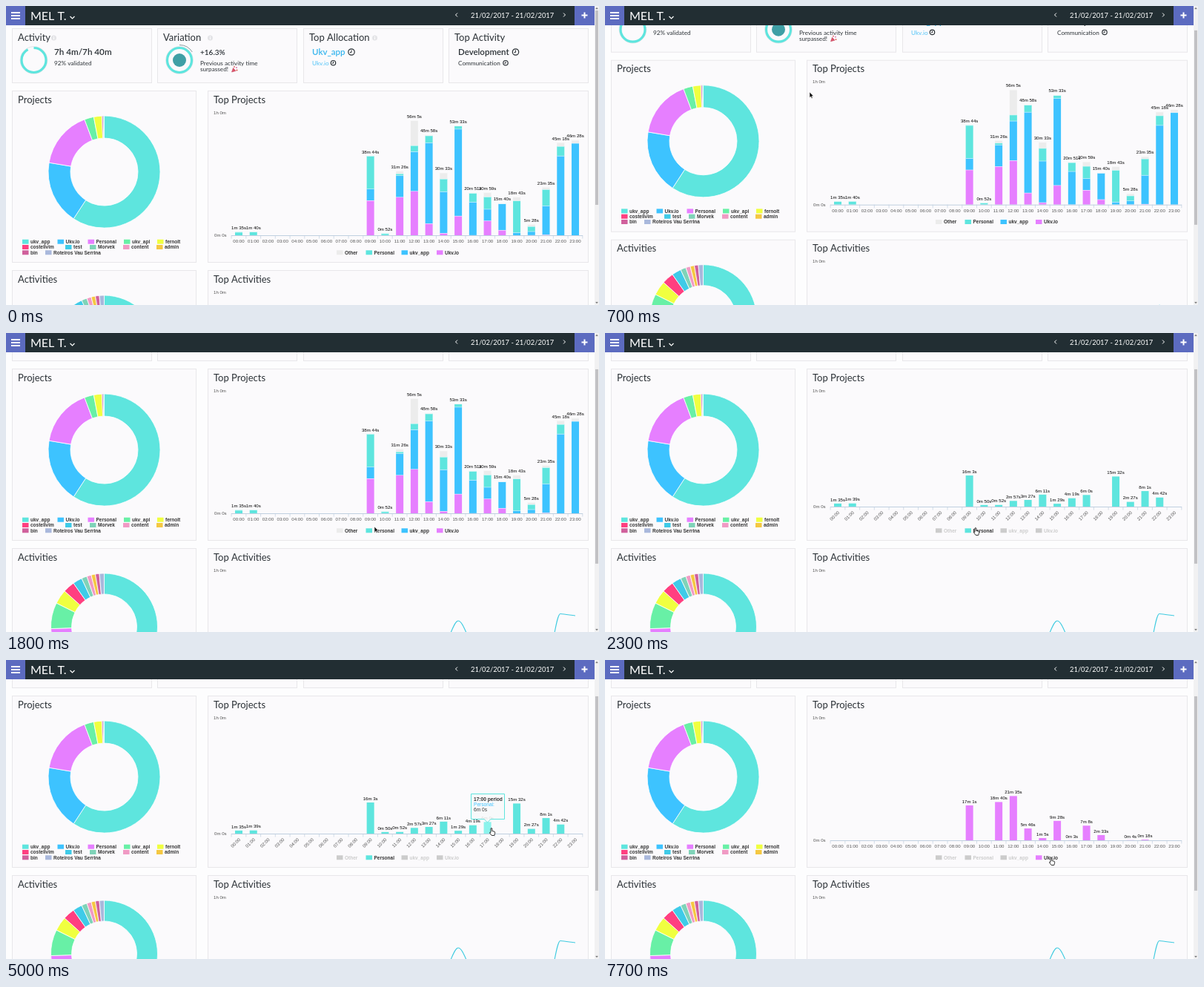
Animation, 800 px wide and 403 px high, one loop 8000 ms. Source, as an HTML page with a canvas:

```html
<!DOCTYPE html>
<html lang="en">
<head>
<meta charset="utf-8">
<title>Time dashboard</title>
<style>
  html, body { margin: 0; width: 100%; height: 100%; overflow: hidden; background: #fdfdfe; }
  canvas { display: block; }
</style>
</head>
<body>
<canvas id="stage" width="800" height="403"></canvas>
<script>
const ctx = document.getElementById('stage').getContext('2d');
const LOOP = 8000, TAU = Math.PI * 2;
const UI = 'Lato, "Open Sans", sans-serif', CHART = '"Liberation Sans", Arial, sans-serif';
const TEAL = '#5ee5de', BLUE = '#3dc3ff', PINK = '#e67fff', GREY = '#ececec', OFF = '#cccccc';
const DARK = '#2b3136', INDIGO = '#5c6bc0';

const projects = [
  ['ukv_app', TEAL, 22, 0], ['Ukv.io', BLUE, 69.5, 0], ['Personal', PINK, 110.5, 0],
  ['ukv_api', '#68f0a6', 159, 0], ['fernolt', '#f0ff40', 204, 0],
  ['costelivim', '#ff3f80', 22, 1], ['test', '#3fcbe8', 80, 1], ['Morvek', '#7fd3b8', 113, 1],
  ['content', '#f09ac4', 158, 1], ['admin', '#f5c842', 203, 1],
  ['bin', '#d0609c', 22, 2], ['Roteiros Vau Serrina', '#a9b8dc', 53, 2]
];
const palette = projects.map(p => p[1]);
const projectEnds = [213.2, 279.5, 339.4, 349.2, 357.6, 359, 360];
const activityEnds = [190, 230, 268, 296.4, 312, 324.8, 335, 341, 345.9, 350.4, 354.8, 360];

// seconds per hour of day: total, Personal, Ukv.io, Other
const hours = {
  0: [95, 95, 0, 0], 1: [100, 99, 0, 0], 9: [2324, 963, 1021, 0], 10: [52, 50, 0, 0],
  11: [1886, 52, 1120, 80], 12: [3365, 177, 1295, 735], 13: [2938, 207, 346, 20],
  14: [1833, 371, 65, 180], 15: [3213, 89, 568, 10], 16: [1251, 259, 3, 15],
  17: [1259, 360, 428, 130], 18: [940, 0, 153, 15], 19: [1123, 932, 0, 110],
  20: [328, 147, 4, 65], 21: [1415, 481, 18, 70], 22: [2718, 282, 0, 110], 23: [2788, 0, 0, 90]
};
const series = [
  ['Other', GREY, 446], ['Personal', TEAL, 485.5], ['ukv_app', BLUE, 533.5], ['Ukv.io', PINK, 581]
];

const scrollKeys = [[300, 0], [400, 8], [500, 8], [600, 24], [700, 41.3], [800, 56], [900, 66]];
const cursorKeys = [
  [400, 276, 116], [1000, 276, 116], [1800, 497, 261], [2100, 498, 262], [3100, 498, 262],
  [3600, 562, 241], [3900, 612, 238], [4200, 612, 238], [5000, 653, 226], [5300, 653, 226],
  [5500, 648, 232], [6100, 602, 254], [6500, 600, 266]
];

function track(keys, t) {
  const i = keys.findIndex(k => k[0] > t);
  if (i < 0) return keys[keys.length - 1].slice(1);
  if (!i) return keys[0].slice(1);
  const a = keys[i - 1], b = keys[i], p = (t - a[0]) / (b[0] - a[0]);
  return a.slice(1).map((v, n) => v + (b[n + 1] - v) * p);
}

function text(s, x, y, size, color = DARK, weight = 400, family = UI, align = 'left') {
  ctx.font = `${weight} ${size}px ${family}`;
  ctx.fillStyle = color;
  ctx.textAlign = align;
  ctx.fillText(s, x, y);
}
const label = (s, x, y, align, color = '#000') => text(s, x, y, 6.1, color, 400, CHART, align);

function rect(x, y, w, h, color) {
  ctx.fillStyle = color;
  ctx.fillRect(x, y, w, h);
}
function line(points, color, width = 1) {
  ctx.beginPath();
  points.forEach(p => ctx.lineTo(...p));
  ctx.strokeStyle = color;
  ctx.lineWidth = width;
  ctx.stroke();
}
function arc(x, y, r, color, width, from = 0, to = 1) {
  ctx.beginPath();
  ctx.arc(x, y, r, (from - .25) * TAU, (to - .25) * TAU);
  ctx.strokeStyle = color;
  ctx.lineWidth = width;
  ctx.stroke();
}
function disc(x, y, r, color) {
  ctx.beginPath();
  ctx.arc(x, y, r, 0, TAU);
  ctx.fillStyle = color;
  ctx.fill();
}
function shape(path, fill, stroke, width) {
  const p = new Path2D(path);
  ctx.fillStyle = fill;
  ctx.fill(p);
  ctx.strokeStyle = stroke;
  ctx.lineWidth = width;
  ctx.stroke(p);
}

function card(x, y, w, h, title) {
  rect(x, y, w, h, '#fbfafc');
  ctx.strokeStyle = '#e8e7ea';
  ctx.lineWidth = 1;
  ctx.strokeRect(x + .5, y + .5, w - 1, h - 1);
  text(title, x + 8, y + 16.5, 13);
}
function info(x, y) {
  disc(x, y, 3.5, '#e4e4e7');
  rect(x - .5, y - 2, 1, 1, '#fff');
  rect(x - .5, y - .5, 1, 2.5, '#fff');
}
function clock(x, y, r) {
  arc(x, y, r, DARK, 1.2);
  line([[x, y - r * .6], [x, y + .5], [x - r * .5, y + .5]], DARK);
}

function donut(x, y, outer, inner, ends, colors) {
  let from = 0;
  ends.forEach((end, i) => {
    const a = (from / 360 - .25) * TAU, b = (end / 360 - .25) * TAU;
    ctx.beginPath();
    ctx.arc(x, y, outer, a, b);
    ctx.arc(x, y, inner, b, a, true);
    ctx.closePath();
    ctx.fillStyle = colors[i];
    ctx.fill();
    ctx.strokeStyle = '#fff';
    ctx.lineWidth = .8;
    ctx.stroke();
    from = end;
  });
}

function legendItem(name, color, x, y, ink = '#333') {
  rect(x, y - 3, 8.5, 6, color);
  text(name, x + 11, y + 2.2, 6.5, ink, 700, CHART);
}

function summaryCards() {
  card(8, 30, 189, 74, 'Activity');
  info(64.5, 43);
  arc(37.5, 73, 18.3, '#d9dde0', .8);
  arc(37.5, 73, 16.5, TEAL, 3.2, 0, .92);
  text('7h 4m/7h 40m', 65, 66, 11.7, DARK, 600);
  text('92% validated', 65, 80, 8.2);

  card(204, 30, 189, 74, 'Variation');
  info(275.5, 43);
  arc(234, 73, 18.3, '#d9dde0', .8);
  arc(234, 73, 16.5, TEAL, 3.2);
  arc(234, 73, 20.5, '#8b9a9e', 1, 0, .16);
  disc(234, 73, 9, '#3f9fa5');
  text('+16.3%', 262, 66, 10, DARK, 600);
  text('Previous activity time', 262, 80, 8.2);
  text('surpassed!', 262, 88, 8.2);
  shape('M304.5 89L306.5 83.5L310 87.5Z', '#e0526a', '#b8405a', .5);
  [[308, 82, '#e05a5a'], [311, 83, '#d66ba8'], [311.5, 86.5, '#d8503c']]
    .forEach(([x, y, c]) => disc(x, y, .9, c));

  card(401, 30, 189, 74, 'Top Allocation');
  info(497.5, 43);
  text('Ukv_app', 413, 66, 11.5, '#35b5ee', 600);
  clock(466, 62, 4.2);
  text('Ukv.io', 413, 80, 8.2, '#4fc3f7');
  clock(441.5, 76.7, 3.2);

  card(597, 30, 189, 74, 'Top Activity');
  text('Development', 610, 66, 11.5, DARK, 600);
  clock(687.5, 62, 4.2);
  text('Communication', 610, 80, 8.2);
  clock(674, 76.7, 3.2);
}

function projectCard() {
  card(8, 114, 249, 232, 'Projects');
  donut(132.5, 223.6, 75.5, 45.5, projectEnds, [...palette.slice(0, 5), '#d0609c', '#3fcbe8']);
  projects.forEach(([name, color, x, row]) => legendItem(name, color, x, 317.7 + row * 7.3));
}

const duration = s => `${Math.floor(s / 60)}m ${s % 60}s`;

function barChart(t) {
  card(272, 114, 514, 232, 'Top Projects');
  const only = t < 2300 ? '' : t < 7500 ? 'Personal' : 'Ukv.io';
  const slanted = only === 'Personal';
  const base = slanted ? 300 : 309, scale = (base - 143.2) / 3600;
  const grow = only === 'Ukv.io' ? Math.min(1, .35 + (t - 7500) / 300) : 1;
  const tip = t >= 4700 && t < 6500, step = 19.74;
  label('1h 0m', 280, 145.6, 'left', '#555');
  label('0m 0s', 281, base + 2.2, 'left', '#555');

  const tops = [];
  for (const h in hours) {
    const [total, personal, site, other] = hours[h], x = 314 + h * step;
    const parts = [[site, 'Ukv.io', PINK], [total - personal - site - other, 'ukv_app', BLUE],
      [personal, 'Personal', TEAL], [other, 'Other', GREY]];
    let y = base, sum = 0;
    for (const [value, name, color] of parts) {
      if (!value || only && name !== only) continue;
      const height = value * scale * grow;
      y -= height;
      sum += value;
      rect(x - 5, y, 10, height, tip && t < 5600 && h === '17' ? '#8cf3ec' : color);
      if (!only) rect(x - 5, y, 10, .6, '#fff');
    }
    if (sum) tops.push([duration(sum), x, y - 3.3]);
  }
  tops.forEach(([s, x, y]) => label(s, x, y, 'center'));

  line([[304, base + .5], [778, base + .5]], '#c0d0e0');
  for (let h = 0; h <= 24; h++) {
    const x = 304.1 + h * step;
    line([[x, base], [x, base + 4.5]], '#c0d0e0', .7);
    if (h === 24) break;
    const name = String(h).padStart(2, '0') + ':00';
    ctx.save();
    ctx.translate(x + (slanted ? 12.5 : step / 2), base + (slanted ? 8.5 : 10));
    if (slanted) ctx.rotate(-Math.PI / 4);
    label(name, 0, 0, slanted ? 'right' : 'center', '#555');
    ctx.restore();
  }

  series.forEach(([name, color, x]) => {
    const on = !only || name === only || name === 'Ukv.io' && t >= 7200;
    legendItem(name, on ? color : OFF, x, 332.3, on ? '#333' : OFF);
  });
  if (tip) tooltip();
}

function tooltip() {
  shape('M627.5 246.5H672.5V280.5H654L649.5 285L645 280.5H627.5Z', 'rgba(249,250,250,.88)', TEAL, 1);
  text('17:00 period', 631, 256, 6.6, '#333', 700, CHART);
  text('Personal:', 631, 263.3, 6.6, BLUE, 400, CHART);
  text('6m 0s', 631, 270.4, 6.6, '#333', 400, CHART);
}

function activityCards() {
  card(8, 356, 249, 232, 'Activities');
  donut(132.5, 462, 72, 44, activityEnds, palette);
  card(272, 356, 514, 232, 'Top Activities');
  label('1h 0m', 280, 387.6, 'left', '#555');
  ctx.strokeStyle = '#3fcbe0';
  ctx.lineWidth = 1.1;
  ctx.stroke(new Path2D('M590 490C598 480 604 454 610 454S621 472 630 490' +
    'M728 520C738 495 742 444 748 444.5S760 446 768 447'));
}

function header() {
  rect(0, 0, 794, 26, '#222e33');
  rect(0, 0, 26, 26, INDIGO);
  rect(767, 0, 27, 26, INDIGO);
  [8, 12, 16].forEach(y => rect(7, y, 12, 2, '#fff'));
  rect(776.5, 11.5, 8, 2, '#fff');
  rect(779.5, 8.5, 2, 8, '#fff');
  text('MEL T.', 33, 19, 16, '#fff');
  line([[86.5, 14], [89.5, 17], [92.5, 14]], '#fff', 1.2);
  line([[609, 9.5], [606.5, 12], [609, 14.5]], '#fff');
  line([[752, 9.5], [754.5, 12], [752, 14.5]], '#fff');
  text('21/02/2017 - 21/02/2017', 627, 16, 9.4, '#fff');
}

function scrollbar(scroll) {
  rect(794, 0, 6, 403, '#f1f1f2');
  rect(795, 6 + scroll * .65, 4, 262, '#c1c1c4');
  shape('M795.5 4L797 2L798.5 4Z', '#777', '#777', .3);
  shape('M795.5 399L797 401L798.5 399Z', '#777', '#777', .3);
}

function cursor(t) {
  if (t < 400) return;
  const hand = t >= 1900 && t < 3200 || t >= 4700 && t < 5500 || t >= 6400;
  ctx.save();
  ctx.translate(...track(cursorKeys, t));
  if (hand) {
    shape('M1 1Q2 0 2.8 1V4.5L6 5.2Q7 5.6 6.6 7.5L5.8 10.5H2.2L-.5 7Q-.6 5.8 1 6.4Z', '#fff', '#222', .9);
  } else {
    shape('M0 0V7.5L1.7 6L2.8 8.6L4.1 8L3 5.5H5.3Z', '#111', '#fff', .5);
  }
  ctx.restore();
}

function draw(t) {
  const [scroll] = track(scrollKeys, t);
  rect(0, 0, 800, 403, '#fdfdfe');
  ctx.save();
  ctx.translate(0, -scroll);
  summaryCards();
  projectCard();
  barChart(t);
  activityCards();
  ctx.restore();
  header();
  scrollbar(scroll);
  cursor(t);
}

const start = performance.now();
function frame() {
  const t = (performance.now() - start) % LOOP;
  draw(Math.floor(t / 100) * 100);   // the screen updates ten times a second
  requestAnimationFrame(frame);
}
frame();
</script>
</body>
</html>
```
